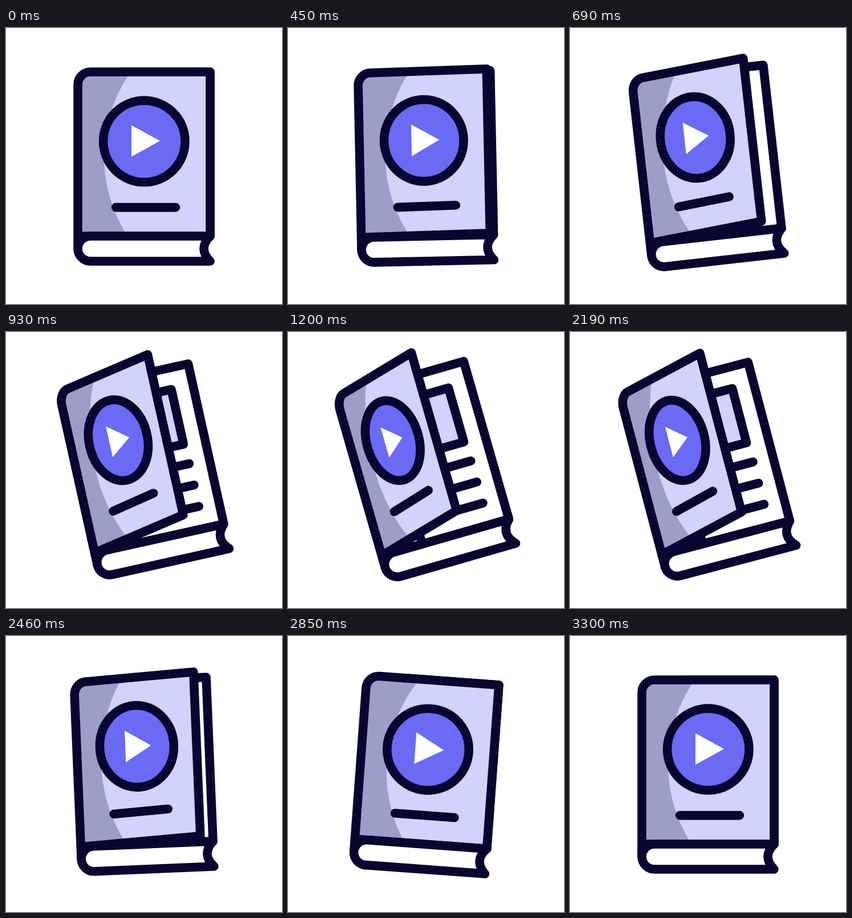
An HTML page with a canvas for the animation above (3600 ms loop, 484 by 484 pixels).

```html
<!DOCTYPE html>
<html lang="en">
<head>
<meta charset="utf-8">
<title>Book</title>
<style>
html, body { margin: 0; width: 100%; height: 100%; overflow: hidden; background: #fff; }
canvas { display: block; width: 484px; height: 484px; }
</style>
</head>
<body>
<canvas id="stage" width="484" height="484"></canvas>
<script>
const ctx = document.getElementById('stage').getContext('2d');
const INK = '#080530', LIGHT = '#d2d2ff', SHADE = '#9d9dca', ACCENT = '#6a6af4', WHITE = '#fff';
const LOOP = 3600, STEP = 30, HINGE = 126;

// [time in ms, value], eased between neighbours
const TILT = [[300, 0], [1200, -16], [2100, -16], [2700, 5], [3300, 0]];
const OPEN = [[300, 0], [1200, 0.362], [1650, 0.386], [2100, 0.362], [2640, 0]];

function valueAt(keys, t) {
  if (t <= keys[0][0]) return keys[0][1];
  for (let i = 1; i < keys.length; i++) {
    const [t0, a] = keys[i - 1], [t1, b] = keys[i];
    if (t < t1) {
      const u = (t - t0) / (t1 - t0);
      return a + (b - a) * u * u * (3 - 2 * u);
    }
  }
  return keys[keys.length - 1][1];
}

function paint(path, fill, outline = true) {
  if (fill) {
    ctx.fillStyle = fill;
    ctx.fill(path);
  }
  if (outline) ctx.stroke(path);
}

function bar(x1, y1, x2, y2) {
  paint(new Path2D(`M${x1} ${y1}L${x2} ${y2}`));
}

const page = new Path2D('M200 77H358V365H200Z');
const picture = new Path2D('M165 114.5H319.5V213H165Z');
const base = new Path2D('M358 365H148A22 22 0 0 0 148 409H358Q336 387 358 365Z');
const coverFlat = new Path2D('M126 387V99A22 22 0 0 1 148 77H358V365H126Z');
const glowFlat = new Path2D();
glowFlat.arc(430, 225, 258, 0, 7);

function drawPage() {
  paint(page, WHITE);
  paint(picture, LIGHT);
  for (let i = 0; i < 3; i++) {
    const y = 248.4 + 38.4 * i;
    bar(165, y, 322, y);
  }
}

function drawCover(open) {
  const squeeze = 1 - open, lift = 0.474 * open;
  const bend = new DOMMatrix([squeeze, -lift, 0, 1, HINGE * open, HINGE * lift]);
  const cover = new Path2D(), glow = new Path2D();
  cover.addPath(coverFlat, bend);
  glow.addPath(glowFlat, bend);

  paint(cover, SHADE, false);
  ctx.save();
  ctx.clip(cover);
  paint(glow, LIGHT, false);
  ctx.restore();
  paint(cover);

  const bx = x => HINGE + (x - HINGE) * squeeze;
  const cy = 198.8 - 62 * open;
  const disc = new Path2D();
  disc.ellipse(bx(242.3), cy, 71.7 * squeeze, 71.7, 0, 0, 2 * Math.PI);
  paint(disc, ACCENT);
  const top = cy - 28.3, bottom = cy + 27;
  paint(new Path2D(`M${bx(220)} ${top}L${bx(270)} ${cy - 0.7}L${bx(220)} ${bottom}Z`), WHITE, false);
  bar(192.6 - 67 * open, 314.6 - 49 * open, 297.4 - 169 * open, 314.6 - 103 * open);
}

function draw(t) {
  ctx.setTransform(1, 0, 0, 1, 0, 0);
  ctx.fillStyle = WHITE;
  ctx.fillRect(0, 0, 484, 484);
  ctx.translate(242, 242);
  ctx.rotate(valueAt(TILT, t) * Math.PI / 180);
  ctx.translate(-242, -242);
  ctx.strokeStyle = INK;
  ctx.lineWidth = 15.6;
  ctx.lineJoin = ctx.lineCap = 'round';
  drawPage();
  drawCover(valueAt(OPEN, t));
  paint(base, WHITE);
}

const start = performance.now();
function tick() {
  const t = (performance.now() - start) % LOOP;
  draw(Math.floor(t / STEP) * STEP);
  requestAnimationFrame(tick);
}
tick();
</script>
</body>
</html>
```
